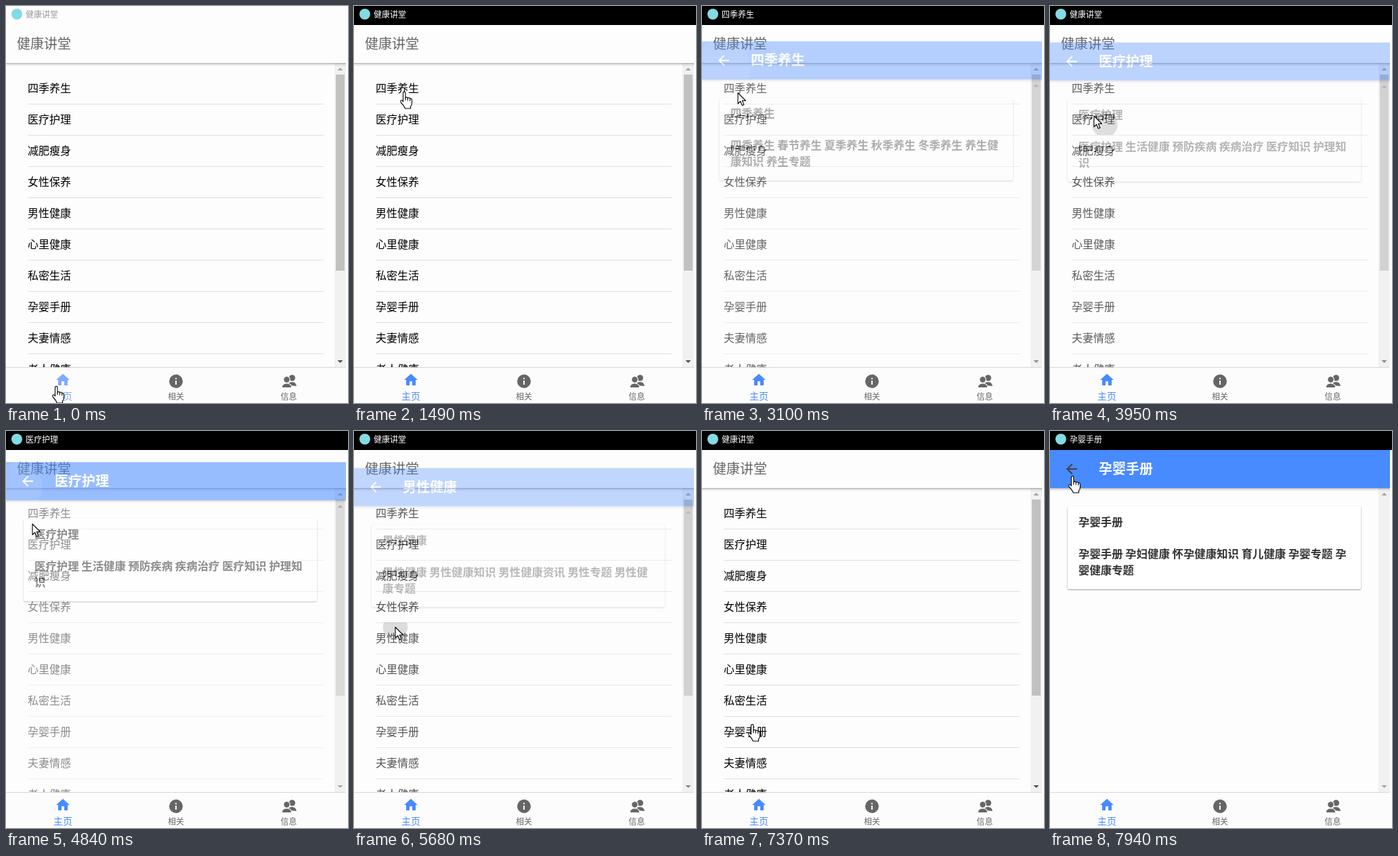
These frames come from a looping animation (505 by 585 pixels, 8000 ms). An HTML page:

```html
<!DOCTYPE html>
<html lang="zh-CN">
<head>
<meta charset="utf-8">
<style>
html, body { margin: 0; width: 505px; height: 585px; overflow: hidden; background: #fdfdfd; }
svg { display: block; }
text { font-family: 'Noto Sans CJK SC', 'Noto Sans CJK', sans-serif; font-size: 16px; white-space: pre; }
.small { font-size: 12px; }
.heading { font-size: 20px; }
.bold { font-size: 16.4px; font-weight: bold; fill: #333; }
.card { fill: #fff; filter: drop-shadow(0 1.5px 1px rgba(0,0,0,.4)); }
</style>
</head>
<body>
<svg id="stage" width="505" height="585"></svg>
<script>
const LOOP = 8000, APP = '健康讲堂', BLUE = '#488aff';
const ITEMS = ['四季养生', '医疗护理', '减肥瘦身', '女性保养', '男性健康',
  '心里健康', '私密生活', '孕婴手册', '夫妻情感', '老人健康'];

// Each visit opens a topic, then optionally returns to the list.
const VISITS = [
  { item: 0, enter: 2040, leave: 2955, tap: [72, 126], back: [31, 66],
    lines: ['四季养生 春节养生 夏季养生 秋季养生 冬季养生 养生健', '康知识 养生专题'] },
  { item: 1, enter: 3908, leave: 4716, tap: [81, 175], back: [18, 64],
    lines: ['医疗护理 生活健康 预防疾病 疾病治疗 医疗知识 护理知', '识'] },
  { item: 4, enter: 5640, leave: 6527, tap: [61, 289], back: [34, 51],
    lines: ['男性健康 男性健康知识 男性健康资讯 男性专题 男性健', '康专题'] },
  { item: 7, enter: 7435, leave: 9000, tap: [74, 432], back: [33, 66],
    lines: ['孕婴手册 孕妇健康 怀孕健康知识 育儿健康 孕婴专题 孕', '婴健康专题'] },
];

// The screen refreshes only at these moments.
const TICKS = [0, 710, 830, 980, 1100, 1220, 1340, 1490, 2080, 2200, 2320, 2440, 2560,
  2710, 2830, 2950, 3100, 3230, 3380, 3540, 3680, 3950, 4070, 4190, 4310, 4430, 4580,
  4720, 4840, 4990, 5140, 5260, 5380, 5680, 5800, 5930, 6050, 6190, 6310, 6470, 6590,
  6730, 6860, 7000, 7120, 7250, 7370, 7520, 7670, 7790, 7940];

// Pointer path: time, x, y, shape
const POINTER = [
  [0, 74, 560, 'hand'], [830, 74, 560, 'hand'], [1340, 74, 170, 'hand'], [1490, 74, 126, 'hand'],
  [2080, 72, 126, 'arrow'], [2560, 37, 75, 'hand'], [2950, 31, 66, 'hand'], [3100, 53, 128, 'arrow'],
  [3230, 88, 188, 'hand'], [3380, 96, 200, 'hand'], [3540, 83, 181, 'hand'], [3680, 81, 175, 'hand'],
  [3950, 65, 162, 'arrow'], [4430, 22, 62, 'hand'], [4720, 20, 63, 'hand'], [4840, 39, 137, 'arrow'],
  [4990, 51, 221, 'hand'], [5380, 61, 285, 'hand'], [5680, 61, 289, 'arrow'], [6050, 30, 94, 'hand'],
  [6310, 33, 52, 'hand'], [6470, 33, 55, 'hand'], [6590, 36, 80, 'arrow'], [6860, 64, 358, 'hand'],
  [7370, 74, 432, 'hand'], [7520, 74, 432, 'arrow'], [7790, 31, 128, 'arrow'], [7940, 33, 66, 'hand'],
];

const triangle = (y, dir, color) =>
  `<path d="M489.5 ${y + 2 * dir}h8l-4 ${-4 * dir}z" fill="${color}"/>`;
const scrollbar = (thumb, downColor) => `
  <rect x="485" y="84" width="17" height="449" fill="#f1f1f1"/>
  ${thumb ? '<rect x="487" y="101" width="13" height="289" fill="#c1c1c1"/>' : ''}
  ${triangle(93, 1, '#a3a3a3')}${triangle(524, -1, downColor)}`;
const headerBar = color => `
  <rect y="84" width="502" height="5" fill="url(#shade)"/>
  <rect y="28" width="502" height="56" fill="${color}"/>`;
const rows = ITEMS.map((name, i) => `
  <text x="32" y="${127 + 46 * i}">${name}</text>
  <rect x="32" y="${144 + 46 * i}" width="437" height="1" fill="#dedede"/>`).join('');

document.getElementById('stage').innerHTML = `
  <defs>
    <linearGradient id="shade" x2="0" y2="1">
      <stop stop-opacity=".32"/><stop offset=".4" stop-opacity=".1"/><stop offset="1" stop-opacity="0"/>
    </linearGradient>
    <clipPath id="content"><rect y="28" width="502" height="505"/></clipPath>
    <clipPath id="row"><rect id="rowBox" x="16" width="453" height="46"/></clipPath>
    <clipPath id="bar"><rect y="28" width="502" height="56"/></clipPath>
    <clipPath id="tab"><rect y="533" width="167" height="52"/></clipPath>
  </defs>
  <rect width="505" height="585" fill="#fdfdfd"/>
  <rect id="caption" width="505" height="28"/>
  <circle cx="16" cy="12" r="8" fill="#84dbe3"/>
  <text id="captionText" class="small" x="29" y="17"></text>

  <g clip-path="url(#content)">
    ${rows}
    <circle id="rowRipple" clip-path="url(#row)"/>
    ${scrollbar(true, '#505050')}
    ${headerBar('#fdfdfd')}
    <text class="heading" x="16" y="63" fill="#666">${APP}</text>
    <g id="page">
      <rect y="28" width="502" height="505" fill="#fdfdfd"/>
      ${scrollbar(false, '#a3a3a3')}
      ${headerBar(BLUE)}
      <circle id="backRipple" fill="#fff" clip-path="url(#bar)"/>
      <path id="back" transform="translate(20 44)"
        d="M20 11H7.83l5.59-5.59L12 4l-8 8 8 8 1.41-1.41L7.83 13H20z"/>
      <text id="pageTitle" class="heading" x="72" y="63" fill="#fff" font-weight="600"></text>
      <rect class="card" x="26" y="111" width="433" height="122" rx="2"/>
      <text id="cardTitle" class="bold" x="42" y="140"></text>
      <text id="line0" class="bold" x="42" y="187"></text>
      <text id="line1" class="bold" x="42" y="211"></text>
    </g>
  </g>

  <rect y="532" width="502" height="1" fill="#d6d6d6"/>
  <rect y="533" width="505" height="52" fill="#fcfcfc"/>
  <circle id="tabRipple" fill="${BLUE}" clip-path="url(#tab)"/>
  <g id="home" fill="${BLUE}">
    <path transform="translate(72 539)" d="M10 20v-6h4v6h5v-8h3L12 3 2 12h3v8z"/>
    <text x="70" y="580" style="font-size:14px">主页</text>
  </g>
  <g fill="#666">
    <path transform="translate(239 541)" d="M12 2a10 10 0 1 0 0 20 10 10 0 0 0 0-20zm1 15h-2v-6h2zm0-8h-2V7h2z"/>
    <text class="small" x="239" y="580">相关</text>
    <circle cx="422.5" cy="548" r="4.6"/>
    <path d="M416 559q1-5 6.5-5t6.5 6z"/>
    <g stroke="#fcfcfc" stroke-width="1.2">
      <circle cx="414.5" cy="550.5" r="4.8"/>
      <path d="M407.2 562.5q.3-6.5 7.3-6.5t7.3 6.5z"/>
    </g>
    <text class="small" x="405.5" y="580">信息</text>
  </g>

  <g id="pointer" fill="#fff" stroke="#000" stroke-width="1.1" stroke-linejoin="round">
    <path id="arrow" d="M0 0V16l3.7-3.5 2.6 6 2.6-1.1-2.5-5.9H11.5z"/>
    <g id="hand">
      <path d="M-1.5 15V2Q-1.5.4.2.4T1.9 2V9Q4.4 7.4 5.3 9.6 7.9 8.4 8.7 10.5 11.3 9.9 11.5 12.5V17Q11.5 20 9.5 22V25H1.5Q0 21-4.5 16.5-6.2 13.5-4 12.8-2.5 12.8-1.5 15z"/>
      <path d="M1.9 9v4M5.3 10v3.5M8.7 11v3" fill="none"/>
    </g>
  </g>`;

const el = id => document.getElementById(id);
const set = (id, attrs) => {
  for (const name in attrs) el(id).setAttribute(name, attrs[name]);
};
const clamp = v => Math.min(1, Math.max(0, v));

function bezier(x1, y1, x2, y2) {
  const at = (a, b, s) => 3 * a * s * (1 - s) ** 2 + 3 * b * s * s * (1 - s) + s ** 3;
  return x => {
    let low = 0, high = 1;
    for (let i = 0; i < 24; i++) {
      const mid = (low + high) / 2;
      if (at(x1, x2, mid) < x) low = mid; else high = mid;
    }
    return at(y1, y2, high);
  };
}
const easeEnter = bezier(.36, .66, .04, 1);
const easeLeave = bezier(.47, 0, .745, .715);

function ripple(id, [cx, cy], age) {
  const active = age > 0 && age < 200;
  set(id, { cx, cy, r: active ? 2 + .27 * age : 0, opacity: active ? .28 * (1 - age / 200) : 0 });
}

function drawPointer(t) {
  const i = POINTER.findLastIndex(key => key[0] <= t);
  const [t0, x0, y0, shape] = POINTER[i];
  const [t1, x1, y1] = POINTER[i + 1] || [LOOP, x0, y0];
  const k = (t - t0) / (t1 - t0);
  set('pointer', { transform: `translate(${x0 + (x1 - x0) * k} ${y0 + (y1 - y0) * k})` });
  set('hand', { visibility: shape === 'hand' ? 'visible' : 'hidden' });
  set('arrow', { visibility: shape === 'arrow' ? 'visible' : 'hidden' });
  set('back', { fill: shape === 'hand' ? '#424242' : '#fff' });
}

function drawPage(t) {
  const visit = VISITS.findLast(v => v.enter <= t) || VISITS[0];
  const { item, enter, leave, tap, back, lines } = visit;
  const shown = t < leave
    ? easeEnter(clamp((t - enter) / 280)) * (t >= enter)
    : 1 - easeLeave(clamp((t - leave) / 200));
  set('page', {
    opacity: shown,
    visibility: shown > .002 ? 'visible' : 'hidden',
    transform: `translate(0 ${40 * (1 - shown)})`,
  });
  el('pageTitle').textContent = el('cardTitle').textContent = ITEMS[item];
  lines.forEach((line, i) => el('line' + i).textContent = line);
  set('rowBox', { y: 98 + 46 * item });
  ripple('rowRipple', tap, t - enter + 20);
  ripple('backRipple', back, t - leave);
  el('captionText').textContent = t >= enter + 280 && t < leave + 200 ? ITEMS[item] : APP;
}

function draw(time) {
  const t = TICKS.findLast(tick => tick <= time);
  const focused = t >= 710;
  set('caption', { fill: focused ? '#000' : '#fdfdfd' });
  set('captionText', { fill: focused ? '#fff' : '#999' });
  set('home', { opacity: focused ? 1 : .7 });
  ripple('tabRipple', [74, 560], t - 800);
  drawPage(t);
  drawPointer(t);
}

const start = performance.now();
function loop() {
  draw((performance.now() - start) % LOOP);
  requestAnimationFrame(loop);
}
loop();
</script>
</body>
</html>
```
